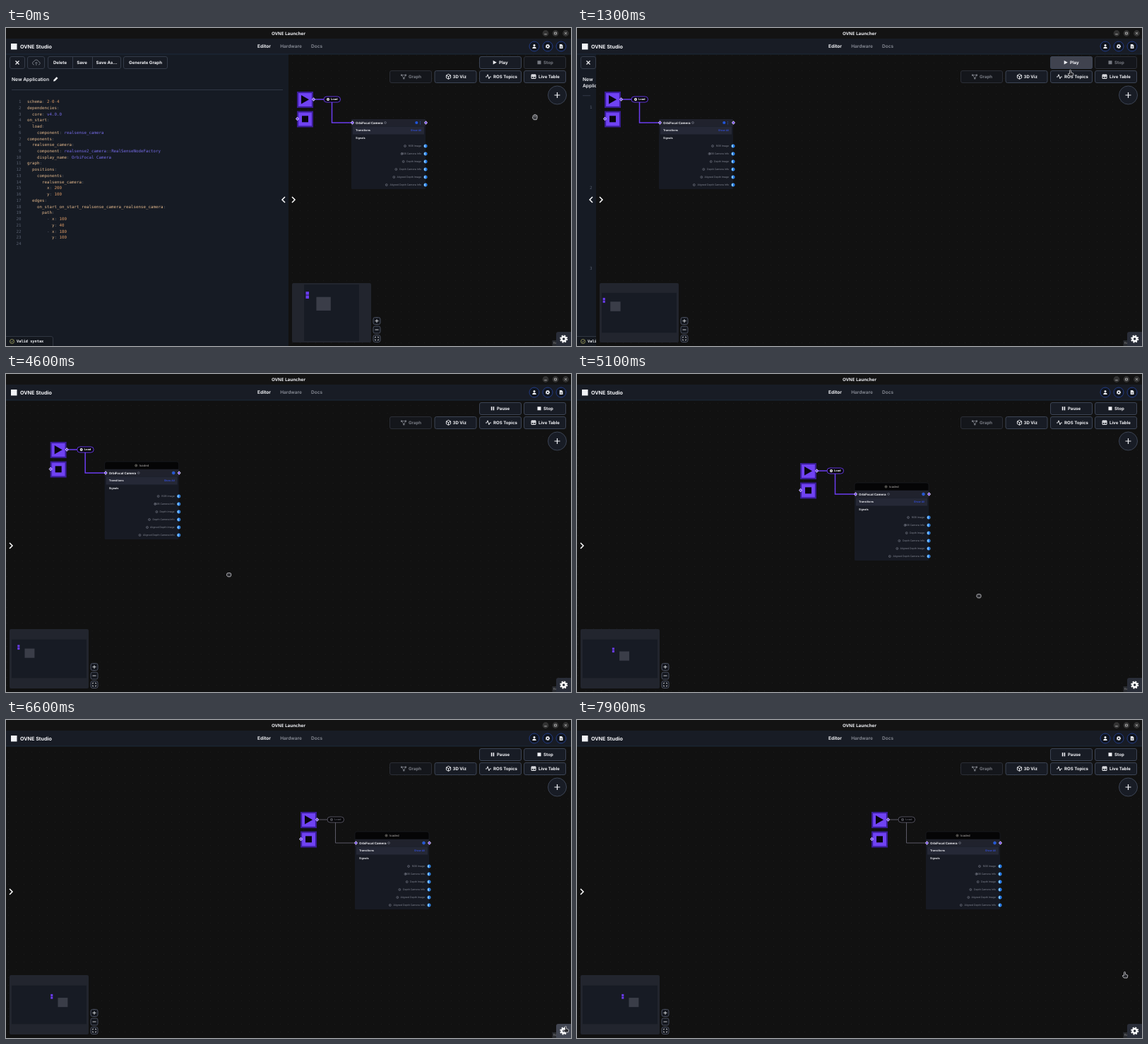
An HTML page that plays this animation: 800 px wide and 450 px high, repeating every 8000 ms.

```html
<!DOCTYPE html>
<html lang="en">
<head>
<meta charset="utf-8">
<title>Studio editor</title>
<style>
  html, body { margin: 0; width: 100%; height: 100%; overflow: hidden; background: #111; }
  svg { display: block; width: 100vw; height: 100vh; }
  text { font-family: Inter, "Open Sans", sans-serif; text-rendering: geometricPrecision; white-space: pre; }
  .mono { font-family: "DejaVu Sans Mono", "Liberation Mono", monospace; }
  .os { font-family: "Open Sans", "Noto Sans", sans-serif; }
</style>
</head>
<body>
<svg id="stage" viewBox="0 0 800 450"></svg>
<script>
const LOOP = 8000, STEP = 100;
const INK = '#f2f3f7', PANEL = '#161b24', LINE = '#343b49', VIOLET = '#6b3cf0';

// ---- drawing helpers ----
const text = (x, y, s, size, { fill = INK, weight = 700, anchor = 'start', cls = '' } = {}) =>
  `<text x="${x}" y="${y + size * .36}" font-size="${size}" fill="${fill}" font-weight="${weight}" text-anchor="${anchor}" class="${cls}">${s}</text>`;
const rect = (x, y, w, h, fill, more = '') =>
  `<rect x="${x}" y="${y}" width="${w}" height="${h}" fill="${fill}" ${more}/>`;
const path = (d, stroke = INK, width = 1, fill = 'none', more = '') =>
  `<path d="${d}" stroke="${stroke}" stroke-width="${width}" fill="${fill}" ${more}/>`;
const circle = (x, y, r, fill, more = '') => `<circle cx="${x}" cy="${y}" r="${r}" fill="${fill}" ${more}/>`;
const group = (id, body, more = '') => `<g id="${id}" ${more}>${body}</g>`;
const at = (x, y, body) => `<g transform="translate(${x} ${y})">${body}</g>`;
const box = (x, y, w, h, fill = '#171b24', stroke = LINE, more = '') =>
  rect(x + .5, y + .5, w - 1, h - 1, fill, `stroke="${stroke}" rx="2.5" ${more}`);

const icons = {
  play: c => path('M-2.3 -2.8L2.8 0L-2.3 2.8Z', 'none', 0, c),
  stop: c => rect(-2.5, -2.5, 5, 5, c),
  pause: c => rect(-2.2, -2.6, 1.6, 5.2, c) + rect(.6, -2.6, 1.6, 5.2, c),
  graph: c => path('M-3 -2.2H3M-2.6 -2L.4 2.4L2.8 -2', c, .8) +
    rect(-4, -3.2, 2.2, 2.2, c) + rect(1.8, -3.2, 2.2, 2.2, c) + rect(-.8, 1.4, 2.2, 2.2, c),
  cube: c => path('M0 -3.5L3.1 -1.8V1.8L0 3.5L-3.1 1.8V-1.8ZM-3.1 -1.8L0 0L3.1 -1.8M0 0V3.5', c, .9),
  pulse: c => path('M-4 .3H-2.3L-1 -3L.9 3L2 .3H4', c, .9),
  table: c => path('M-3 -2.6H3V2.6H-3ZM-3 -.4H3M0 -2.6V2.6', c, 1) + rect(-3, -3, 6, 1.8, c),
  gear: c => circle(0, 0, 2.5, 'none', `stroke="${c}" stroke-width="2"`) +
    circle(0, 0, 3.9, 'none', `stroke="${c}" stroke-width="1.5" stroke-dasharray="1.7 1.363"`),
  user: c => circle(0, -1.5, 1.5, c) + path('M-2.8 2.9Q-2.6 .5 0 .5Q2.6 .5 2.8 2.9Z', 'none', 0, c),
  doc: c => path('M-2.2 -3H.8L2.4 -1.4V3H-2.2Z', 'none', 0, c) + path('M-1 .1H1.2M-1 1.4H1.2', PANEL, .6),
};
const info = (x, y, c) => circle(x, y, 1.5, 'none', `stroke="${c}" stroke-width=".6"`) + circle(x, y, .5, c);
const diamond = (x, y) => path(`M${x - 2} ${y}L${x} ${y - 2.3}L${x + 2} ${y}L${x} ${y + 2.3}Z`, '#e9e2ff', .9, VIOLET);

function button(x, y, label, icon, { dim = false, fill, iconX = 20, labelX = 28 } = {}) {
  const c = dim ? '#777a82' : INK;
  return box(x, y, 60, 18, fill || (dim ? '#14161b' : '#181c25'), dim ? '#2b2e36' : '#3c4454') +
    at(x + iconX, y + 8.8, icons[icon](c)) + text(x + labelX, y + 8.6, label, 6.1, { fill: c });
}

// ---- graph ----
const block = (y, glyph) => rect(12, y, 23, 23, '#391d94') + rect(14, y + 2, 19, 19, VIOLET) +
  rect(15, y + 3, 17, 17, '#7043f2') + glyph;

const signals = [['RGB Image', 165], ['RGB Camera Info', 160.5], ['Depth Image', 162.7],
  ['Depth Camera Info', 152.3], ['Aligned Depth Image', 149.3], ['Aligned Depth Camera Info', 138.8]];

const signalRow = ([name, iconX], i) => {
  const y = 167 + 11 * i;
  return info(iconX, y, '#767a86') + text(188, y, name, 3.5, { fill: '#858995', weight: 400, anchor: 'end' }) +
    circle(194, y, 2.2, '#1268e8', 'stroke="#49a4ff" stroke-width=".7"') + path(`M194 ${y - 2}A2 2 0 0 0 194 ${y + 2}Z`, 'none', 0, '#8fd0ff');
};

const edge = (id, color, ink, width) => group(id,
  path('M35 101H61.5V134H90', color, width) +
  rect(50, 97, 23.5, 8, '#050507', `rx="4" stroke="${color}" stroke-width=".9"`) +
  circle(56, 101, 2, ink) + path('M55 101H57M56 100V102', '#111', .5) +
  text(60, 101, 'Load', 4, { fill: ink }));

const graph = rect(-1100, -440, 2750, 1320, 'url(#dots)') +
  edge('edgeOn', VIOLET, '#fff', 1.5) + edge('edgeOff', '#5b5966', '#55565e', 1) +
  block(90, path('M18 95L29 101.3L18 107.6Z', 'none', 0, '#08060f')) +
  block(117.5, rect(19, 124.3, 9, 9, '#08060f')) +
  diamond(35.5, 101) + diamond(12.5, 128.5) +
  group('loaded', path('M89 129V121Q89 118 92 118H191Q194 118 194 121V129Z', '#23252e', .5, '#050506') +
    info(133.5, 123.5, '#a8a49b') + text(138, 123.5, 'loaded', 4.2, { fill: '#9b9795', weight: 500 })) +
  rect(89, 129, 105, 99, '#171a23', 'rx="1.5"') + rect(89, 129, 105, 10, '#20222d', 'rx="1.5"') +
  rect(91, 139.5, 101, 11, '#252836') +
  text(95, 134, 'OrbiFocal Camera', 4.4) + info(137, 134, '#767a86') +
  group('idleMenu', circle(181.3, 134, 2.1, '#2055d8') + text(186.5, 134, '⋮', 5, { fill: '#3a70ef', anchor: 'middle' })) +
  group('runMenu', circle(186.5, 134, 2, '#2055d8', 'stroke="#477cf0" stroke-width=".4"')) +
  text(95, 145, 'Transitions', 3.9, { weight: 600 }) +
  text(188, 145, 'Show All', 3.6, { fill: '#3553ee', weight: 500, anchor: 'end' }) +
  text(95, 156, 'Signals', 3.9, { weight: 600 }) +
  diamond(90.5, 134) + diamond(194.5, 134) + signals.map(signalRow).join('');

// ---- code panel ----
const source = `schema: 2-0-4
dependencies:
  core: v4.0.0
on_start:
  load:
    component: realsense_camera
components:
  realsense_camera:
    component: realsense2_camera::RealSenseNodeFactory
    display_name: OrbiFocal Camera
graph:
  positions:
    components:
      realsense_camera:
        x: 200
        y: 100
  edges:
    on_start_on_start_realsense_camera_realsense_camera:
      path:
        - x: 100
          y: 40
        - x: 180
          y: 100
`.split('\n');
const CHAR = 3.504, ROW = 8.74;
const hue = { key: '#dfb58a', mark: '#666b78', number: '#dc9a66', value: '#756be6' };

function tokens(line) {
  const m = line.match(/^(\s*(?:- )?)([^:]+)(:)(.*)$/);
  if (!m) return [];
  const [, lead, key, colon, value] = m;
  return [[lead, hue.mark], [key, hue.key], [colon, hue.mark],
    ...(value.match(/::|-|[^:-]+/g) || []).map(s =>
      [s, /^(::|-)$/.test(s) ? hue.mark : /^[\s\d]+$/.test(s) ? hue.number : hue.value])];
}

function codeMarkup(cols) {
  let row = 0, out = '';
  source.forEach((line, i) => {
    const y = 104 + row * ROW;
    out += text(21.5, y, i + 1, 5.8, { fill: '#596070', weight: 400, anchor: 'end', cls: 'mono' });
    let pos = 0;
    for (const [s, fill] of tokens(line)) {
      for (let k = 0; k < s.length;) {
        const col = pos % cols, part = s.slice(k, k + cols - col);
        out += text(30 + col * CHAR, y + Math.floor(pos / cols) * ROW, part, 5.82, { fill, weight: 400, cls: 'mono' });
        k += part.length;
        pos += part.length;
      }
    }
    row += Math.max(1, Math.ceil(line.length / cols));
  });
  return out;
}

const label = (x, s) => text(x, 48.6, s, 6.1, { anchor: 'middle' });
const panel = rect(0, 37, 400, 413, PANEL) +
  box(5, 40, 22, 18) + path('M13.5 46.5L18.5 51.5M18.5 46.5L13.5 51.5', INK, 1.2) +
  box(30, 40, 25, 18) + path('M40 52H39.5Q37.3 51.5 37.5 49.3Q38 47.5 39.7 47.4Q40.3 45 43 45Q45.5 45.2 46 47.6Q48.5 48 48.2 50.2Q47.8 52 46 52M42.9 53V48.5M41.2 50L42.9 48.3L44.6 50', '#858a94', .8) +
  box(59, 40, 104, 18) + path('M94.5 40V58M122.5 40V58', LINE) +
  label(76.5, 'Delete') + label(107.5, 'Save') + label(142.5, 'Save As...') +
  box(166, 40, 63, 18) + label(197.5, 'Generate Graph') +
  group('titleWide', text(8, 73, 'New Application', 6.7, { weight: 600 }) +
    path('M67.5 75.2L68 73.2L71.7 69.5L73.2 71L69.5 74.7Z', INK, .6, INK)) +
  group('titleNarrow', text(8, 73, 'New', 6.7, { weight: 600 }) + text(8, 81.6, 'Application', 6.7, { weight: 600 })) +
  group('body', path('M8 87.5H392', '#303745', 1, 'none', 'id="rule"') + group('code', '')) +
  box(-3, 436, 70, 17, '#14181f', '#303641') +
  circle(8.5, 443.5, 3, 'none', 'stroke="#a8a763" stroke-width=".8"') + path('M7 443.5L8.2 444.7L10.2 442.3', '#a8a763', .8) +
  text(15, 443.2, 'Valid syntax', 5.3, { cls: 'mono' });

// ---- window chrome ----
const chrome = rect(0, 0, 800, 15, '#131313') + text(400, 7.4, 'OVNE Launcher', 6.2, { anchor: 'middle', cls: 'os' }) +
  [764, 778, 792.5].map(x => circle(x, 7.5, 4.4, '#333')).join('') +
  path('M762.2 8.8H765.8M776.6 6.2H779.4V8.9H776.6ZM791 6L794 9M794 6L791 9', '#ddd', .7) +
  rect(0, 15, 800, 22, '#181c25') + path('M0 37H800', '#1d2b3a', 1) +
  rect(7, 22, 8.5, 8.5, INK) + text(20, 26.3, 'OVNE Studio', 7.2) +
  text(365.5, 25.6, 'Editor', 6.5, { anchor: 'middle' }) +
  text(403.5, 25.6, 'Hardware', 6.5, { anchor: 'middle', fill: '#8a8e98', weight: 600 }) +
  text(440, 25.6, 'Docs', 6.5, { anchor: 'middle', fill: '#8a8e98', weight: 600 }) +
  [[748, 'user'], [767, 'gear'], [786, 'doc']].map(([x, name]) =>
    circle(x, 26, 7, '#10151f', 'stroke="#223c86" stroke-width="1"') +
    `<g transform="translate(${x} 26) scale(${name === 'gear' ? .68 : 1})">${icons[name](INK)}</g>`).join('');

const controls = group('idle', button(670, 40, 'Play', 'play', { iconX: 22 }) + button(733, 40, 'Stop', 'stop', { dim: true, iconX: 22 })) +
  group('pressed', button(670, 40, 'Play', 'play', { fill: '#40434f', iconX: 22 })) +
  group('running', button(670, 40, 'Pause', 'pause', { iconX: 19, labelX: 25 }) + button(733, 40, 'Stop', 'stop', { iconX: 22 })) +
  button(543, 60, 'Graph', 'graph', { dim: true, labelX: 27 }) + button(606.5, 60, '3D Viz', 'cube', { labelX: 26 }) +
  button(670, 60, 'ROS Topics', 'pulse', { iconX: 13, labelX: 20 }) + button(733, 60, 'Live Table', 'table', { iconX: 14, labelX: 21 }) +
  circle(780.5, 95, 13, '#181c25', 'stroke="#3c4454"') + path('M776.5 95H784.5M780.5 91V99', INK, 1.2) +
  rect(773.5, 442, 8, 8, '#292b30') + text(775, 446, 'Re', 3.8, { fill: '#888', weight: 400 }) +
  path('M779 450V433Q779 430 782 430H800V450Z', 'none', 0, '#292d38', 'id="gearBox"') + at(789.7, 440, `<g transform="scale(1.2)">${icons.gear('#fff')}</g>`);

const zoomKeys = [414.5, 427, 439.5].map(y => box(119.5, y - 5.5, 11, 11, '#15181f', '#4a5060')).join('') +
  path('M122.5 414.5H127.5M125 412V417M122.5 427H127.5M122.7 438.5V437.2H124M126 437.2H127.3V438.5M127.3 440.5V441.8H126M124 441.8H122.7V440.5', INK, .8);

const cursors = {
  point: path('M-1.5 .6V-3.6A1 1 0 0 1 .5 -3.6V-1L2.8 -.5Q4 -.2 3.8 1L3 4H-1.5L-3.8 1Q-3.2 -.3 -1.5 .6Z', '#d5d5d8', .8, '#26272c'),
  grab: path('M-3 -.2Q-3.2 -2.4 -1.8 -2.5Q-1.4 -3.8 -.2 -3.3Q1 -4 1.6 -2.8Q3.2 -2.9 3.1 -1.2V1.4L2.2 3.7H-1.8L-3.6 1Z', '#d5d5d8', .8, '#3c3d42') +
    path('M-.6 -2.3V-.4M1.2 -2.2V-.4', '#d5d5d8', .5),
  fist: path('M-3 -.6Q-2.9 -2.4 -1.4 -2.4H1.6Q3 -2.2 3 -.8V1.2L2 2.8H-1.6L-3.2 .9Z', '#d5d5d8', .8, '#2c2d32'),
};

const stage = document.getElementById('stage');
stage.innerHTML = `<defs><pattern id="dots" width="11" height="11" patternUnits="userSpaceOnUse">
  <rect x="5" y="5" width="1" height="1" fill="#1b1b1b"/></pattern>
  <clipPath id="panelClip"><rect id="clip" y="37" height="413"/></clipPath></defs>` +
  rect(0, 0, 800, 450, '#111111') + group('graph', graph) +
  group('panel', panel, 'clip-path="url(#panelClip)"') +
  group('side', group('map', '') + zoomKeys + path('M-5 239L-9 243L-5 247M5 239L9 243L5 247', '#fff', 1.5)) +
  chrome + controls +
  Object.entries(cursors).map(([id, art]) => group(id, art)).join('');

// ---- motion ----
const pointer = [[0, 749, 126], [200, 744, 113], [500, 720, 76], [800, 704, 52], [1000, 704, 52], [1300, 699, 64],
  [1500, 620, 165], [1700, 522, 262], [3200, 522, 262], [3300, 522, 262], [3600, 345, 238], [3800, 224, 273],
  [3900, 265, 278], [4500, 265, 278], [5100, 569, 314], [5400, 670, 318], [5900, 748, 380],
  [6400, 793, 438], [7800, 793, 438], [7900, 776, 361]];
const divider = [[900, 400], [1000, 331], [1100, 188], [1200, 80], [1300, 27], [1400, 6], [1500, 0]];

function sample(track, t) {
  const i = track.findIndex(k => k[0] > t);
  if (i === 0) return track[0].slice(1);
  if (i < 0) return track[track.length - 1].slice(1);
  const a = track[i - 1], b = track[i], p = (t - a[0]) / (b[0] - a[0]);
  return a.slice(1).map((v, k) => v + (b[k + 1] - v) * p);
}

const el = id => document.getElementById(id);
const show = (id, on) => el(id).setAttribute('display', on ? 'inline' : 'none');
const move = (id, x, y) => el(id).setAttribute('transform', `translate(${x} ${y})`);

function miniMap(split, panX, panY) {
  const w = 800 - split, s = Math.min(106 / w, 80 / 412);
  const left = 61 - w * s / 2, top = 403 - 206 * s;
  const item = (x, y, iw, ih, fill) =>
    rect(left + (x + panX) * s, top + (y - 38 + panY) * s, iw * s, ih * s, fill);
  return rect(5, 361, 112, 84, '#22252e', 'rx="2"') + rect(left, top, w * s, 412 * s, '#171b24') +
    item(12, 90, 23, 23, VIOLET) + item(12, 117.5, 23, 23, VIOLET) + item(89, 129, 105, 99, '#3a3d48');
}

let columns = 0;
function draw(t) {
  const [split] = sample(divider, t), [x, y] = sample(pointer, t);
  const [dragX, dragY] = sample(pointer, Math.min(Math.max(t, 4500), 5400));
  const panX = dragX - 265, panY = dragY - 278;
  const running = t >= 4100, narrow = split < 70;

  move('graph', split + panX, panY);
  move('side', split, 0);
  el('map').innerHTML = miniMap(split, panX, panY);
  el('clip').setAttribute('width', split);
  el('rule').setAttribute('d', `M8 87.5H${Math.max(19, split - 8)}`);
  move('body', 0, narrow ? 8.2 : 0);
  show('titleWide', !narrow);
  show('titleNarrow', narrow);
  const cols = Math.max(1, Math.floor((split - 38) / CHAR));
  if (cols !== columns) el('code').innerHTML = codeMarkup(columns = cols);

  show('idle', !running);
  show('pressed', t >= 700 && t < 1500);
  show('running', running);
  show('loaded', running);
  show('idleMenu', !running);
  show('runMenu', running);
  show('edgeOn', t < 5500);
  show('edgeOff', t >= 5500);
  el('gearBox').setAttribute('fill', t >= 6300 && t < 7900 ? '#424652' : '#292d38');

  const kind = t >= 4500 && t < 5400 ? 'fist' : y < 78 || t >= 6300 ? 'point' : 'grab';
  for (const id in cursors) show(id, id === kind);
  move(kind, x, y);
}

function tick() {
  draw(Math.floor(performance.now() % LOOP / STEP) * STEP);
  requestAnimationFrame(tick);
}
tick();
</script>
</body>
</html>
```
